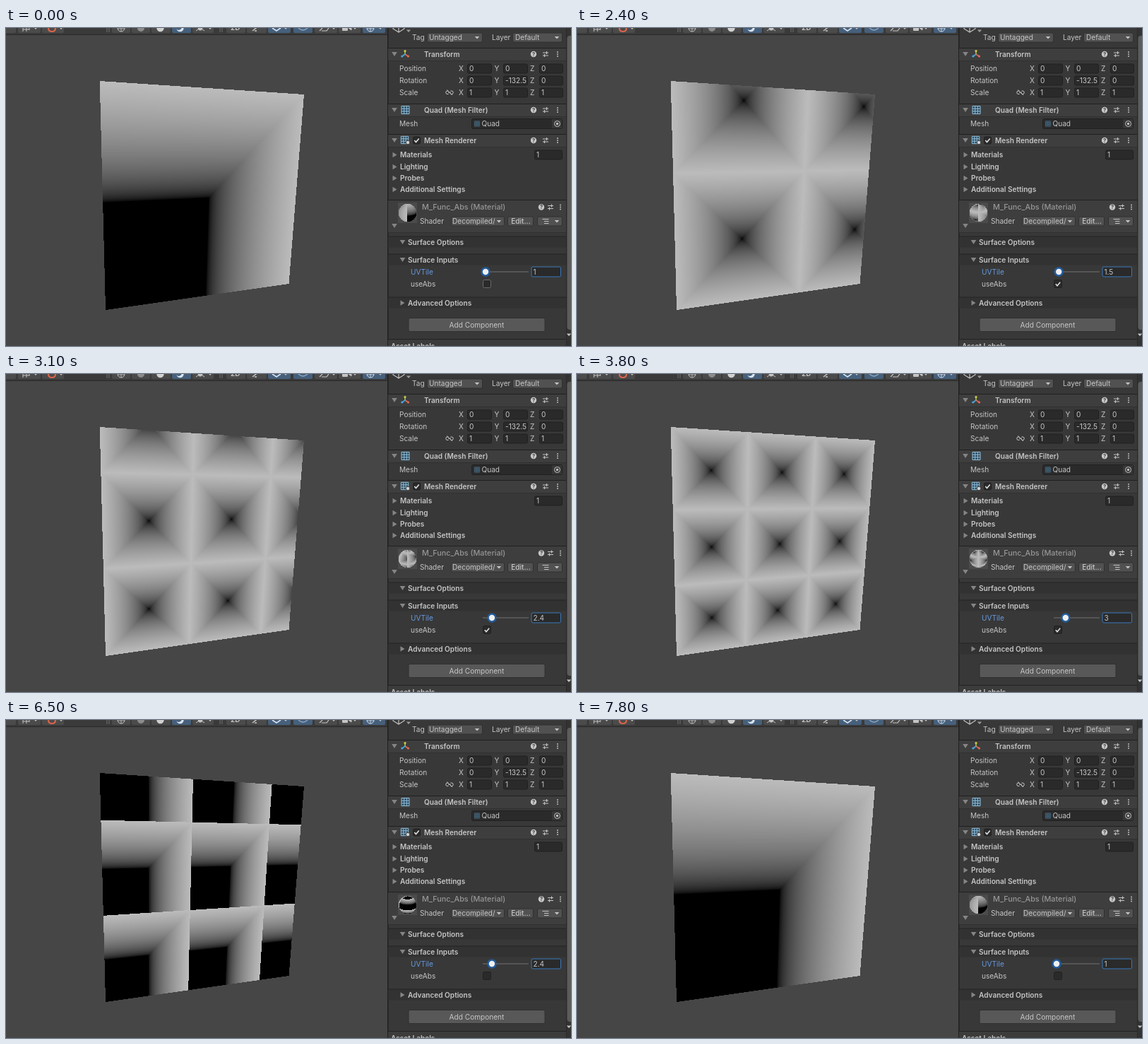
Recreate the animation shown at these times as an HTML page with a canvas. Size 800x450 px, loop 8.3 s.

```html
<!DOCTYPE html>
<html lang="en">
<head>
<meta charset="utf-8">
<title>Abs shader demo</title>
<style>
html, body { margin: 0; width: 100%; height: 100%; overflow: hidden; background: #464646; }
svg, canvas { position: absolute; left: 0; top: 0; width: 800px; height: 450px; display: block; }
text { font-family: Inter, "Liberation Sans", sans-serif; font-size: 10.1px; fill: #c6c6c6; white-space: pre; }
.b { font-weight: 600; }
</style>
</head>
<body>
<svg id="ui" viewBox="0 0 800 450"></svg>
<canvas id="view" width="800" height="450"></canvas>
<script>
const LOOP = 8300;
const ICON = '#c4c4c4';

// ---------- drawing helpers ----------
const rect = (x, y, w, h, fill, more = '') =>
  `<rect x="${x}" y="${y}" width="${w}" height="${h}" fill="${fill}" ${more}/>`;
const path = (d, stroke, width = 1, fill = 'none', more = '') =>
  `<path d="${d}" stroke="${stroke}" stroke-width="${width}" fill="${fill}" ${more}/>`;
const circle = (x, y, r, fill, more = '') =>
  `<circle cx="${x}" cy="${y}" r="${r}" fill="${fill}" ${more}/>`;
const text = (x, mid, str, more = '') => `<text x="${x}" y="${mid + 3.7}" ${more}>${str}</text>`;
const bold = (x, mid, str) => text(x, mid, str, 'class="b"');
const box = (x, y, w, h, fill, edge, more = '') =>
  rect(x + .5, y + .5, w - 1, h - 1, fill, `rx="2" stroke="${edge}" ${more}`);
const clipped = (x, mid, w, str, pad) =>
  `<svg x="${x}" y="${mid - 7}" style="width:${w}px;height:14px">${text(pad, 7, str)}</svg>`;
const field = (x, mid, w, str) =>
  box(x, mid - 7, w, 14, '#2a2a2a', '#202020') + clipped(x, mid, w - 3, str, 3);
const caret = (x, y, fill = ICON) => path(`M${x - 3.2} ${y - 1.6}h6.4l-3.2 3.6z`, 'none', 0, fill);
const down = (x, y) => path(`M${x - 3.8} ${y - 3}h7.6l-3.8 6z`, 'none', 0, '#858585');
const right = (x, y) => path(`M${x - 3} ${y - 3.8}v7.6l6-3.8z`, 'none', 0, '#858585');
const drop = (x, mid, w, str, pad = 3) =>
  box(x, mid - 7, w, 14, '#515151', '#303030') + clipped(x, mid, w - 11, str, pad) + caret(x + w - 8, mid);
const tick = (x, y) => path(`M${x - 3} ${y}l2.2 2.6l4.2 -5`, '#dedede', 1.6);

function tools(y, xs = [747, 764, 781]) {
  const [a, b, c] = xs;
  return circle(a, y, 4.2, '#c8c8c8') +
    `<text x="${a}" y="${y + 2.7}" text-anchor="middle" style="font-size:7.5px;font-weight:700;fill:#3c3c3c">?</text>` +
    path(`M${b - 4} ${y - 2}h8M${b - 4} ${y + 2}h8M${b + 1.5} ${y - 4}v4M${b - 1.5} ${y}v4`, ICON, 1.2) +
    [-3, 0, 3].map(d => circle(c, y + d, .95, ICON)).join('');
}

function mesh(x, y, r, line = '#8fbfdc', fill = '#2f4a5c', width = 1) {
  const s = r * 2 / 3;
  let d = `M${x - r} ${y - r}h${2 * r}v${2 * r}h${-2 * r}z`;
  for (const k of [-.5, .5]) d += `M${x + k * s} ${y - r}v${2 * r}M${x - r} ${y + k * s}h${2 * r}`;
  return path(d, line, width, fill);
}

function header(y, h, title, mid) {
  return rect(541, y, 252, h, '#3e3e3e') + rect(541, y, 252, 1, '#202020') +
    rect(541, y + h, 252, 1, '#303030') + (title ? down(550, mid) + bold(592, mid, title) + tools(mid) : '');
}

// ---------- toolbar above the scene ----------
function toolbar() {
  let s = rect(0, 0, 540, 9, '#3a3a3a') + rect(0, 9, 540, 1, '#292929');
  const cell = (x, w, on) => rect(x, -4, w, 11, on ? '#46607c' : '#4b4b4b', 'rx="2"');
  const cells = [[-4, 18], [17, 32], [51, 31], [150, 26], [178, 26], [206, 27], [235, 27, 1], [264, 30],
    [312, 27], [341, 28], [371, 32, 1], [407, 27, 1], [437, 32], [471, 31], [505, 32, 1]];
  for (const c of cells) s += cell(...c);
  for (const x of [42, 78, 289, 396, 464, 494, 530]) s += caret(x, 0);
  for (const x of [143, 303]) s += path(`M${x} 0v6M${x + 3} 0v6`, '#707070', 1);
  const ring = `stroke="${ICON}"`;
  s += path('M24 0v5M29 0v5M24 2h9M33 0v3', ICON) +
    path('M60 0q0 5 5 5t5 -5', '#d9644a', 2.2) +
    circle(163, 0, 5, 'none', ring) + path('M158 1h10M163 0v5', ICON, .8) +
    circle(191, 0, 5, '#8c8c8c') + circle(218.5, 0, 5.2, '#d0d0d0') +
    circle(246.5, 0, 5.2, '#d8e2ee') + circle(244.5, -1.5, 4.4, '#46607c') +
    circle(275, 0, 3.4, ICON) + path('M269 4l3 -2M281 4l-3 -2', ICON) +
    text(318, -.8, '2D', 'class="b"') +
    path('M349 4l9 -7M352 4h3', ICON, 1.5) +
    path('M377 0l6 4l6 -4', '#d8e2ee', 1.6) +
    path('M414 0q6.500 6 13 0', '#8fa9c4', 1.3) +
    path('M444 4l4 -4M447 4h7l3 -4', ICON, 1.2) +
    rect(476, -4, 8, 8, ICON, 'rx="1"') + path('M485 0l4 3v-4z', ICON, 1, ICON) +
    circle(516, 0, 5, 'none', 'stroke="#d8e2ee"') + path('M511 1h10M516 0v5', '#d8e2ee', .8);
  return s;
}

// ---------- inspector ----------
function inspector() {
  let s = rect(540, 0, 260, 450, '#383838') + rect(540, 0, 1.5, 450, '#202020');
  s += path('M548 -1v2l8 5l8 -5v-2M556 6v-6', ICON, 1.2) + caret(570, 4, '#9a9a9a');
  s += text(575, 13.5, 'Tag') + drop(596, 13.5, 79, 'Untagged') +
    text(688, 13.5, 'Layer') + drop(717, 13.5, 71, 'Default', 4);

  s += header(28, 18, 'Transform', 37) +
    path('M565 37v-5', '#9fd04a', 1.6) + path('M565 37l5 3.500', '#e2694f', 1.6) +
    path('M565 37l-4.500 3.500', '#4aa3dc', 1.6) +
    circle(565, 32.5, 1.6, '#d6c94c') + circle(569.5, 40, 1.6, '#e2694f') + circle(560.8, 40, 1.6, '#4aa3dc');
  const rows = [['Position', '0', '0', '0'], ['Rotation', '0', '-132.5', '0'], ['Scale', '1', '1', '1']];
  rows.forEach(([name, ...vals], i) => {
    const y = 57.5 + 17 * i;
    s += text(557, y, name);
    vals.forEach((v, k) => {
      s += text(641 + 50.5 * k, y, 'XYZ'[k]) + field(653 + 51 * k, y, k < 2 ? 35 : 34, v);
    });
  });
  s += path('M626.500 89h-1.500a2.200 2.200 0 0 0 0 4.500h1.500M629.500 89h1.500a2.200 2.200 0 0 1 0 4.500h-1.500M626 91.200h4M624 87.500l8 7.500', ICON, 1);

  s += header(107, 18, 'Quad (Mesh Filter)', 116) + mesh(565.5, 116, 5.5) +
    text(557, 135.5, 'Mesh') + box(659, 128, 129, 15, '#2a2a2a', '#202020') +
    rect(773, 129, 14, 13, '#373737') + mesh(667, 135.5, 3.6, '#557f98', '#2a3740', .6) +
    text(673.5, 135.5, 'Quad') +
    circle(780.5, 135.5, 4, 'none', `stroke="${ICON}"`) + circle(780.5, 135.5, 1.7, ICON);

  s += header(150, 18, 'Mesh Renderer', 159) + mesh(564.5, 158.5, 5.2) +
    circle(569, 162, 2.8, '#d0d0d0', 'stroke="#3e3e3e"') +
    box(576, 153.5, 11, 11, '#2a2a2a', '#202020') + tick(581.3, 159);
  [['Materials', 179.5], ['Lighting', 196.5], ['Probes', 212.5], ['Additional Settings', 228.5]]
    .forEach(([n, y]) => s += right(550.5, y) + bold(558, y, n));
  s += field(748, 179.5, 40, '1');

  s += header(243, 46) + rect(555, 247, 27, 29, '#4b4b4b') +
    text(589, 253.5, 'M_Func_Abs (Material)', 'style="font-size:10.8px;font-weight:500;fill:#969696"') +
    tools(253.5, [758, 771, 785]) + down(550, 280) +
    text(586, 273.5, 'Shader') + drop(630, 273.5, 76, 'Decompiled/', 2) +
    box(710, 266.5, 37, 14, '#515151', '#303030') +
    text(729, 273.5, 'Edit...', 'text-anchor="middle" style="font-weight:500"') +
    box(752, 266.5, 36, 14, '#515151', '#303030') + caret(780, 273.5) +
    path('M759.500 270.500h9M762 273.500h6.500M762 276.500h6.500', ICON, 1.1);

  for (const [y, n, mark] of [[303, 'Surface Options', down], [328, 'Surface Inputs', down], [389, 'Advanced Options', right]])
    s += rect(541, y - 7.5, 252, 15, '#323232') + rect(541, y - 8.5, 252, 1, '#222') +
      mark(561.5, y) + bold(569, y + .3, n);

  s += box(569.5, 410, 194, 20, '#585858', '#303030') +
    text(666.5, 420, 'Add Component', 'text-anchor="middle"') +
    rect(541, 440, 252, 10, '#3c3c3c') + rect(541, 440, 252, 1, '#222') + bold(545, 450.5, 'Asset Labels');
  s += rect(793, 0, 7, 450, '#333') + rect(793, 0, 1, 450, '#2a2a2a') +
    rect(794.5, 11, 9, 416, '#5c5c5c', 'rx="4"') + caret(797, 434);
  return s;
}

// ---------- material properties that change ----------
function properties({ tile, abs, onTile, thumbHover, boxHover }) {
  const tint = on => on ? 'style="fill:#6699e0"' : '';
  const shown = Math.floor(tile * 10 + 1e-6) / 10;
  const x = 679 + 6.4 * (shown - 1);
  let s = text(573, 345.5, 'UVTile', tint(onTile)) + text(573, 362.5, 'useAbs', tint(!onTile));
  s += rect(675, 344.3, 65, 1.4, '#626262');
  if (onTile) s += circle(x, 345, 6.7, '#225c9c');
  s += circle(x, 345, 4.2, onTile || thumbHover ? '#efefef' : '#cfcfcf');
  s += box(743.5, 337.5, 42.5, 15, '#2a2a2a', onTile ? '#3a79bb' : '#202020') +
    text(746.5, 345.3, shown);
  const edge = !onTile ? '#3a79bb' : boxHover ? '#6a6a6a' : '#202020';
  s += box(675, 356, 12, 12, onTile ? '#2a2a2a' : '#29394c', edge);
  return s + (abs ? tick(680.8, 362.2) : '');
}

// ---------- shader ----------
const shade = (u, v, tile, abs) => {
  const p = n => { const d = n * tile % 1 - .5; return abs ? Math.abs(d) : d; };
  const c = Math.max(0, p(u), p(v));
  return 255 * (c < .0031308 ? 12.92 * c : 1.055 * c ** (1 / 2.4) - .055);
};

// Maps a stage point to quad coordinates; corners run from bottom left, anticlockwise.
function unproject([x0, y0], [x1, y1], [x2, y2], [x3, y3]) {
  const ax = x1 - x2, ay = y1 - y2, bx = x3 - x2, by = y3 - y2;
  const sx = x0 - x1 + x2 - x3, sy = y0 - y1 + y2 - y3, den = ax * by - bx * ay;
  const g = (sx * by - sy * bx) / den, h = (ax * sy - ay * sx) / den;
  const a = x1 - x0 + g * x1, b = x3 - x0 + h * x3;
  const d = y1 - y0 + g * y1, e = y3 - y0 + h * y3;
  return (x, y) => {
    const w = (d * h - e * g) * x + (b * g - a * h) * y + a * e - b * d;
    return [((e - y0 * h) * x + (x0 * h - b) * y + b * y0 - x0 * e) / w,
      ((y0 * g - d) * x + (a - x0 * g) * y + x0 * d - a * y0) / w];
  };
}

const quadUV = unproject([141, 399], [400.5, 362], [422, 94], [132.7, 75]);

// The preview sphere is seen from 20 degrees above.
const TILT = Math.PI / 9, COS = Math.cos(TILT), SIN = Math.sin(TILT);
function sphereUV(x, y) {
  const nx = (x - 568.5) / 12.8, up = (261.5 - y) / 12.8, r = nx * nx + up * up;
  if (r > 1) return [-1, -1];
  const nz = Math.sqrt(1 - r);
  const lon = Math.atan2(nx, nz * COS - up * SIN) / (2 * Math.PI);
  return [lon < 0 ? lon + 1 : lon, Math.asin(up * COS + nz * SIN) / Math.PI + .5];
}

const ctx = document.getElementById('view').getContext('2d');
function paint(x, y, w, h, toUV, tile, abs) {
  const img = ctx.createImageData(w, h);
  for (let j = 0, i = 0; j < h; j++) for (let k = 0; k < w; k++, i += 4) {
    const [u, v] = toUV(x + k + .5, y + j + .5);
    if (u < 0 || u >= 1 || v < 0 || v >= 1) continue;
    img.data.fill(shade(u, v, tile, abs), i, i + 3);
    img.data[i + 3] = 255;
  }
  ctx.putImageData(img, x, y);
}

// ---------- timeline ----------
const keys = [[0, 1], [2000, 1], [2800, 2.195], [3800, 3], [6100, 3], [6900, 1.915], [7800, 1], [LOOP, 1]];
function tileAt(t) {
  const i = keys.findIndex(k => k[0] > t);
  const [t0, v0] = keys[i - 1], [t1, v1] = keys[i];
  return v0 + (v1 - v0) * (t - t0) / (t1 - t0);
}

function stateAt(t) {
  const within = (a, b) => t >= a && t < b;
  return {
    tile: tileAt(t),
    abs: within(700, 5100),
    onTile: !within(600, 1500) && !within(5000, 6200),
    thumbHover: within(1200, 1500),
    boxHover: t < 600 || within(4600, 5000)
  };
}

const ui = document.getElementById('ui');
ui.innerHTML = rect(0, 0, 540, 450, '#464646') + toolbar() + inspector() + '<g id="props"></g>';
const props = document.getElementById('props');
let last = '';

function frame(now) {
  const s = stateAt(Math.floor(now % LOOP / 100) * 100);
  const key = JSON.stringify(s);
  if (key !== last) {
    last = key;
    props.innerHTML = properties(s);
    paint(131, 74, 293, 327, quadUV, s.tile, s.abs);
    paint(555, 248, 27, 27, sphereUV, s.tile, s.abs);
  }
  requestAnimationFrame(frame);
}
frame(performance.now());
</script>
</body>
</html>
```
